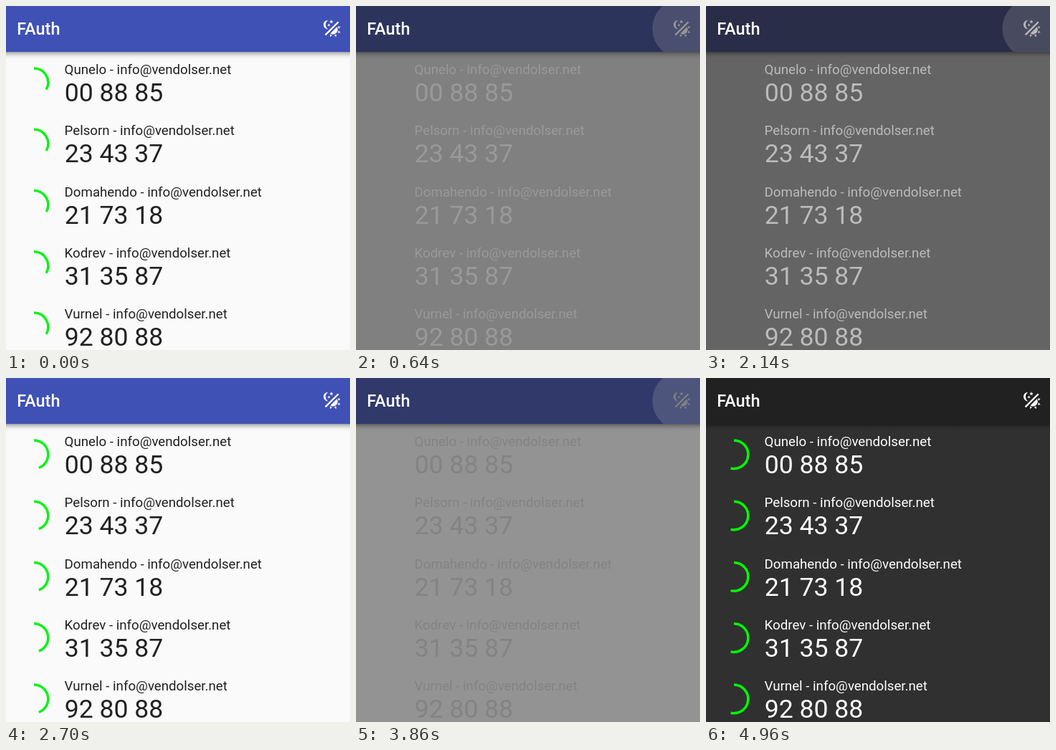
An HTML page that plays this animation: 480 px wide and 480 px high, repeating every 5.02 s.

```html
<!DOCTYPE html>
<html lang="en">
<head>
<meta charset="utf-8">
<title>FAuth</title>
<style>
  html, body { margin: 0; width: 100%; height: 100%; overflow: hidden; }
  svg { display: block; width: 100%; height: 100%; font-family: Roboto, sans-serif; }
  .title { font-size: 23.5px; font-weight: 500; fill: #fff; }
  .name { font-size: 18.7px; }
  .code { font-size: 35.6px; }
  .arc { fill: none; stroke-width: 3.5; }
</style>
</head>
<body>
<svg viewBox="0 0 480 480">
  <defs>
    <linearGradient id="shade" x1="0" y1="0" x2="0" y2="1">
      <stop offset="0" stop-opacity=".36"/>
      <stop offset=".3" stop-opacity=".18"/>
      <stop offset=".65" stop-opacity=".05"/>
      <stop offset="1" stop-opacity="0"/>
    </linearGradient>
    <clipPath id="barClip"><rect width="480" height="64"/></clipPath>
  </defs>
  <rect id="page" width="480" height="480"/>
  <g id="rows"></g>
  <rect y="64" width="480" height="10" fill="url(#shade)"/>
  <rect id="bar" width="480" height="64"/>
  <circle id="ripple" cx="455" cy="31.5" r="41.5" fill="#c4c4c4" clip-path="url(#barClip)"/>
  <text class="title" x="15.3" y="39.8">FAuth</text>
  <path id="icon" transform="translate(440.7 17.3) scale(1.168)" d="M7.5,2C5.71,3.15 4.5,5.18 4.5,7.5C4.5,9.82 5.71,11.85 7.53,13C4.46,13 2,10.54 2,7.5A5.5,5.5 0 0,1 7.5,2
    M19.07,3.5L20.5,4.93L4.93,20.5L3.5,19.07Z
    M12.89,5.93L11.41,5L9.97,6L10.39,4.3L9,3.24L10.75,3.12L11.33,1.47L12,3.1L13.73,3.13L12.38,4.26Z
    M9.59,9.54L8.43,8.81L7.31,9.59L7.65,8.27L6.56,7.44L7.92,7.35L8.37,6.06L8.88,7.33L10.24,7.36L9.19,8.23Z
    M19,13.5A5.5,5.5 0 0,1 13.5,19C12.28,19 11.15,18.6 10.24,17.93L17.93,10.24C18.6,11.15 19,12.28 19,13.5
    M14.6,20.08L17.37,18.93L17.13,22.28ZM18.93,17.38L20.08,14.61L22.28,17.15Z
    M20.08,12.42L18.94,9.64L22.28,9.88ZM9.63,18.93L12.4,20.08L9.87,22.27Z"/>
</svg>
<script>
const LOOP = 5020;
const FADE = 200;                    // theme cross-fade
const TAPS = [520, 2090, 3759];      // each tap flips the theme
const ROW = 85.3;
const CX = 39, CY = 106.7, R = 19.8; // first countdown ring

const accounts = [
  ['Qunelo', '00 88 85'],
  ['Pelsorn', '23 43 37'],
  ['Domahendo', '21 73 18'],
  ['Kodrev', '31 35 87'],
  ['Vurnel', '92 80 88']
];

// light and dark values, rgba
const theme = {
  page: [[250, 250, 250, 1], [48, 48, 48, 1]],
  bar: [[63, 81, 181, 1], [33, 33, 33, 1]],
  text: [[0, 0, 0, 0.87], [255, 255, 255, 1]],
  arc: [[10, 243, 22, 1], [0, 255, 0, 1]]
};

const $ = id => document.getElementById(id);
const clamp = v => Math.max(0, Math.min(1, v));
const mix = ([a, b], k) =>
  `rgba(${a.map((v, i) => (v + (b[i] - v) * k).toFixed(i < 3 ? 0 : 3)).join()})`;

$('rows').innerHTML = accounts.map(([name, code], i) => `
  <g transform="translate(0 ${i * ROW})">
    <path class="arc"/>
    <text class="name" x="81.6" y="95">${name} - info@vendolser.net</text>
    <text class="code" x="81.7" y="133">${code}</text>
  </g>`).join('');
const arcs = document.querySelectorAll('.arc');

function arcPath(deg) {
  const a = deg * Math.PI / 180;
  const x = CX + R * Math.sin(a), y = CY - R * Math.cos(a);
  return `M${CX},${CY - R}A${R},${R} 0 ${deg > 180 ? 1 : 0} 1 ${x.toFixed(2)},${y.toFixed(2)}`;
}

function draw(t) {
  let dark = 0, glow = 0, fading = false;
  TAPS.forEach((tap, i) => {
    const k = clamp((t - tap) / FADE);
    dark += i % 2 ? -k : k;
    fading = fading || (k > 0 && k < 1);
    glow = Math.max(glow, Math.min(clamp((t - tap + 110) / 150), clamp((tap + 310 - t) / 200)));
  });

  const text = mix(theme.text, dark);
  $('page').setAttribute('fill', mix(theme.page, dark));
  $('bar').setAttribute('fill', mix(theme.bar, dark));
  $('rows').setAttribute('fill', text);
  $('icon').setAttribute('fill', fading ? text : '#fff');
  $('ripple').setAttribute('opacity', 0.2 * glow);

  const d = arcPath(120 + t * 0.0147), stroke = mix(theme.arc, dark);
  arcs.forEach(arc => {
    arc.setAttribute('d', d);
    arc.setAttribute('stroke', fading ? 'none' : stroke);
  });
}

const start = performance.now();
function tick() {
  draw((performance.now() - start) % LOOP);
  requestAnimationFrame(tick);
}
tick();
</script>
</body>
</html>
```
